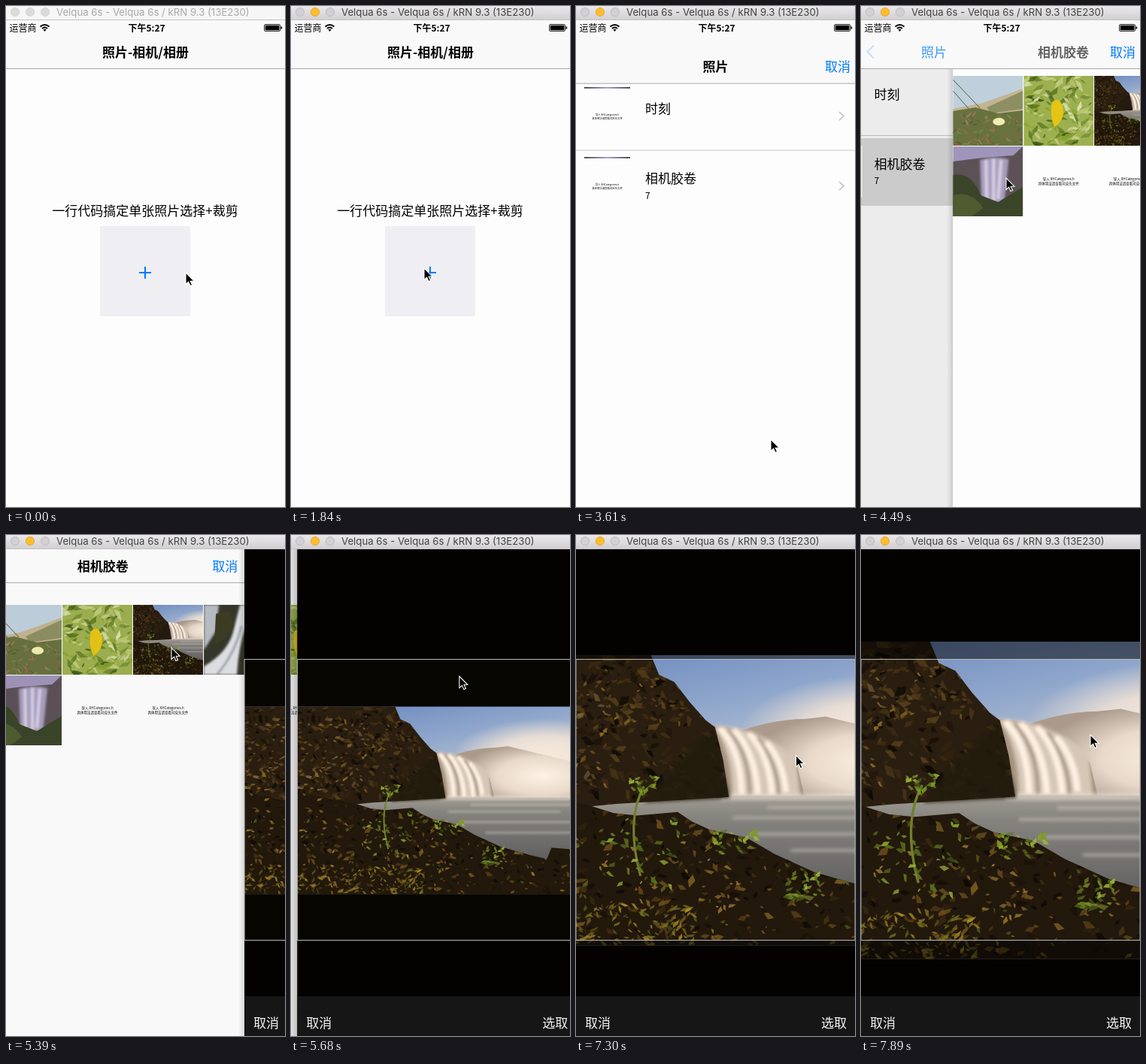
Recreate the animation shown at these times as an HTML page. Size 371 by 667 pixels, loop 8 s.

```html
<!DOCTYPE html>
<html lang="zh">
<head>
<meta charset="utf-8">
<style>
html, body { margin: 0; width: 100%; height: 100%; overflow: hidden; background: #fdfdfd; }
svg { display: block; }
#stage { width: 371px; height: 667px; font: 17px "Noto Sans CJK SC", "Noto Sans CJK", sans-serif; }
.mid { text-anchor: middle; }
.end { text-anchor: end; }
.bold { font-weight: 700; }
.blue { fill: #007aff; }
.big { font-size: 20px; }
.small { font-size: 12px; }
.line { fill: none; stroke-width: 2; }
</style>
</head>
<body>
<svg id="stage" viewBox="0 0 371 667">
  <defs>
    <linearGradient id="sky" x2="0.3" y2="1">
      <stop stop-color="#6685bd"/><stop offset=".3" stop-color="#91a8cc"/><stop offset=".65" stop-color="#d9d3cf"/>
    </linearGradient>
    <radialGradient id="mist">
      <stop stop-color="#fff3e5"/><stop offset=".55" stop-color="#f3e4d5" stop-opacity=".85"/><stop offset="1" stop-color="#eadfd6" stop-opacity="0"/>
    </radialGradient>
    <linearGradient id="water" x2="0" y2="1">
      <stop stop-color="#a09b93"/><stop offset=".15" stop-color="#85837e"/><stop offset=".7" stop-color="#5b5b5b"/>
    </linearGradient>
    <linearGradient id="bar" x2="0" y2="1"><stop stop-color="#eae8ea"/><stop offset="1" stop-color="#d0ced0"/></linearGradient>
    <linearGradient id="edge"><stop stop-opacity="0"/><stop offset="1" stop-opacity=".14"/></linearGradient>
    <linearGradient id="rim"><stop stop-color="#15151f"/><stop offset=".5" stop-color="#8d88c8"/><stop offset="1" stop-color="#15151f"/></linearGradient>
    <filter id="soft"><feGaussianBlur stdDeviation="1.4"/></filter>
    <clipPath id="cliffClip"><path id="cliff" d="M0 0H130L137 17 150 23 163 40 177 56 185 62 192 90 197 122 150 125 100 128 0 138Z"/></clipPath>
    <clipPath id="shoreClip"><path id="shore" d="M0 113L30 121 76 129 98 136 118 138 153 135 165 143 180 150 212 157 236 171 271 187 310 198 332 203 338 188 362 190 371 212V250H0Z"/></clipPath>

    <symbol id="fall" viewBox="0 0 371 250" preserveAspectRatio="xMidYMid slice">
      <rect width="371" height="250" fill="url(#sky)"/>
      <ellipse cx="330" cy="68" rx="125" ry="52" fill="url(#mist)"/>
      <path d="M205 66Q235 55 262 55L280 53 310 60 371 75V125H200Z" fill="#ab9a8b"/>
      <ellipse cx="325" cy="92" rx="110" ry="45" fill="url(#mist)"/>
      <path d="M184 61Q232 64 256 96L262 122H190Z" fill="#a59482"/>
      <g filter="url(#soft)">
        <path d="M184 61Q226 62 255 90L258 122H200Q200 84 184 61Z" fill="#d5c6b6"/>
        <path d="M189 63Q207 80 208 120M201 64Q220 84 222 120M214 67Q232 86 234 120M229 75Q244 92 246 118" fill="none" stroke="#fff1e2" stroke-width="5"/>
        <path d="M196 64Q215 84 215 121M222 71Q239 94 240 121" fill="none" stroke="#94826f" stroke-width="2"/>
      </g>
      <rect y="121" width="371" height="129" fill="url(#water)"/>
      <g filter="url(#soft)" stroke="#c9c3ba" stroke-width="3" opacity=".5">
        <path d="M190 122H371" stroke="#f1e6da" stroke-width="6"/><path d="M230 131H371M200 140H350M220 154H371M250 168H371"/>
      </g>
      <use href="#cliff" fill="#2a1e10"/>
      <g id="cliffSpecks" clip-path="url(#cliffClip)"/>
      <path d="M125 127Q146 92 184 66L198 123Z" fill="#241a10" opacity=".8" filter="url(#soft)"/>
      <use href="#shore" fill="#22180c"/>
      <g id="shoreSpecks" clip-path="url(#shoreClip)"/>
      <g id="plants"><path d="M121 190Q108 142 124 113" fill="none" stroke="#72802b" stroke-width="2"/></g>
    </symbol>
    <symbol id="dune" viewBox="0 0 93 93">
      <rect width="93" height="93" fill="#bfd0dc"/>
      <path d="M0 44L40 36 93 17V93H0Z" fill="#c2b491"/>
      <path d="M45 42L93 20V44L50 50Z" fill="#8d8f63"/>
      <path d="M0 5L36 43M0 20L22 45" stroke="#52583c"/>
      <path d="M0 47L30 42 60 50 93 46V93H0Z" fill="#68723f"/>
      <g id="duneSpecks"/>
      <ellipse cx="61" cy="61" rx="8" ry="5" fill="#f0edb0"/>
    </symbol>
    <symbol id="leaves" viewBox="0 0 93 93">
      <rect width="93" height="93" fill="#9db050"/>
      <g id="leafSpecks"/>
      <path d="M38 35Q48 26 52 42T41 68Q34 52 38 35Z" fill="#e6c414"/>
    </symbol>
    <symbol id="streams" viewBox="0 0 93 93">
      <rect width="93" height="93" fill="#35372a"/>
      <g filter="url(#soft)">
        <path d="M0 0H20L16 35 0 60Z" fill="#b9bec4"/>
        <path d="M48 0H70L56 28Q46 55 44 93H0V82Q34 62 40 32Z" fill="#dfe1e5"/>
        <path d="M72 0H93V93H60Q56 45 72 0Z" fill="#a9aeb5"/>
        <path d="M50 28Q42 64 18 92" fill="none" stroke="#989da4" stroke-width="3"/>
      </g>
      <path d="M16 12L34 8 40 28 30 44 14 54Z" fill="#3d3d24"/>
    </symbol>
    <symbol id="dusk" viewBox="0 0 93 93">
      <rect width="93" height="93" fill="#9f94b9"/>
      <path d="M0 20L40 15 80 12 93 0V93H0Z" fill="#5c5156"/>
      <g filter="url(#soft)">
        <path d="M36 18Q56 12 74 17L68 76H38Z" fill="#a89dbd"/>
        <path d="M44 18L45 72M54 16L54 74M64 18L60 70" stroke="#d9d0e6" stroke-width="4"/>
      </g>
      <path d="M0 38Q24 33 37 65L60 74 93 54V93H0Z" fill="#3b4529"/>
      <path d="M0 65Q25 58 40 82L25 93H0Z" fill="#4e5c30"/>
    </symbol>
    <g id="note" class="mid">
      <text y="-1">导入 XHCategories.h</text><text y="4.5">具体用法请查看对应头文件</text>
    </g>
    <path id="more" class="line" d="M-3-5.5L3 0-3 5.5" stroke="#c7c7cc"/>
    <g id="statusBar">
      <text class="small" x="4.5" y="33.5">运营商</text>
      <path class="line" d="M45.5 27.5Q51.5 22.5 57.5 27.5M48 30Q51.5 27 55 30" stroke="#000"/>
      <path d="M49.5 31.5Q51.5 30 53.5 31.5L51.5 34Z"/>
      <text class="mid small bold" x="187" y="33.5">下午5:27</text>
      <rect x="343.5" y="24.5" width="21" height="9" rx="1.5" fill="none" stroke="#000" stroke-width=".8"/>
      <rect x="344.7" y="25.7" width="18.6" height="6.6"/><path d="M366 27.5Q368 29 366 30.5Z" stroke="#000"/>
    </g>
  </defs>

  <rect width="371" height="667" fill="#fdfdfd"/>
  <rect width="371" height="83" fill="#f9f9f9"/><rect y="83" width="371" height="1" fill="#a9a9ab"/>
  <text class="mid bold" x="185.5" y="67.5">照片-相机/相册</text>
  <text class="mid" x="185" y="279">一行代码搞定单张照片选择+裁剪</text>
  <rect x="125" y="293" width="120" height="120" fill="#efeef3"/>
  <path class="line" d="M177 355H193M185 347V363" stroke="#007aff"/>
  <use id="statusUnder" href="#statusBar"/>

  <rect id="dim" width="371" height="667"/>
  <g id="sheet" class="mid big blue">
    <rect x="8" y="480" width="355" height="114" rx="13" fill="#fafafa"/>
    <rect x="8" y="537" width="355" height="1" fill="#d2d2d5"/>
    <rect x="8" y="602" width="355" height="57" rx="13" fill="#fafafa"/>
    <text x="185.5" y="516.5">拍照</text><text x="185.5" y="573.5">相册中获取</text>
    <text class="bold" x="185.5" y="638.5">取消</text>
  </g>

  <g id="modal">
    <g id="list">
      <rect y="19" width="371" height="648" fill="#fdfdfd"/>
      <rect id="picked" y="176" width="371" height="90" fill="#d9d9d9"/>
      <rect y="172" width="371" height="1" fill="#c8c7cc"/>
      <rect x="11" y="186" width="65" height="69" fill="#fdfdfd"/>
      <rect x="11" y="88.5" width="61" height="1.5" fill="url(#rim)"/><rect x="11" y="181.5" width="61" height="1.5" fill="url(#rim)"/>
      <g font-size="3.4"><use href="#note" x="41.5" y="127"/><use href="#note" x="41.5" y="220"/></g>
      <text x="92" y="123.5">时刻</text><text x="92" y="216.5">相机胶卷</text><text class="small" x="92" y="237">7</text>
      <use href="#more" x="353" y="127"/><use href="#more" x="353" y="220"/>
      <rect id="listShade" width="371" height="667"/>
    </g>
    <g id="grid">
      <rect x="-8" y="19" width="8" height="648" fill="url(#edge)"/>
      <rect y="19" width="371" height="648" fill="#fdfdfd"/>
      <g id="cells"></g>
      <rect id="gridShade" width="371" height="667"/>
    </g>
    <g id="nav">
      <rect y="19" width="375" height="64" fill="#f9f9f9"/><rect y="83" width="375" height="1" fill="#a9a9ab"/>
      <text id="listTitle" class="mid" y="67.5">照片</text>
      <path id="back" class="line" d="M17 52.5L8.5 61 17 69.5" stroke="#007aff"/>
      <text id="gridTitle" class="mid bold" y="67.5">相机胶卷</text>
      <text class="end blue" x="365" y="67.5">取消</text>
    </g>
  </g>

  <g id="crop">
    <rect x="-8" y="19" width="8" height="648" fill="url(#edge)"/>
    <rect y="19" width="371" height="648" fill="#060500"/>
    <svg width="371" height="667"><g id="zoom"><use href="#fall" x="-185.5" y="-125" width="371" height="250"/></g></svg>
    <path d="M0 19H371V165H0ZM0 540H371V614H0Z" opacity=".5"/>
    <rect y="165.5" width="371" height="374" fill="none" stroke="#b9b9b5"/>
    <rect y="614" width="371" height="53" fill="#161616"/>
    <g fill="#f4f4f4"><text x="12" y="656">取消</text><text class="end" x="360" y="656">选取</text></g>
  </g>

  <use id="statusOver" href="#statusBar"/>
  <g id="title">
    <rect id="titleBar" width="371" height="19"/><rect y="18" width="371" height="1" fill="#c4c2c4"/>
    <g id="lights" stroke-width=".8"><circle cx="12" cy="8" r="5.6"/><circle cx="32" cy="8" r="5.6"/><circle cx="52" cy="8" r="5.6"/></g>
    <text id="caption" x="67" y="12.7" font-family="Inter, sans-serif" font-size="13.2">Velqua 6s - Velqua 6s / kRN 9.3 (13E230)</text>
  </g>
  <path id="cursor" d="M0 0V15.5L3.6 12.2 6 17.5 8.6 16.4 6.2 11.2H11Z" stroke="#fff" stroke-width="1.1"/>
</svg>
<script>
const $ = id => document.getElementById(id);
const set = (id, attrs) => { for (const k in attrs) $(id).setAttribute(k, attrs[k]); };
const move = (id, x, y) => set(id, { transform: `translate(${x} ${y})` });

let seed = 7;
const rand = (a = 1, b = 0) => (seed = seed * 16807 % 2147483647, b + (a - b) * seed / 2147483647);

// Scatters small tilted lens shapes over a box.
function specks(id, n, [x, y, w, h], colors, size, flat = 0.5) {
  let out = '';
  for (let i = 0; i < n; i++) {
    const r = rand(size, size * 0.3), s = r * flat;
    out += `<path d="M${-r} 0L${-r * rand(0.6)} ${-s}L${r} ${rand(s, -s)}L${r * rand(0.5)} ${s}Z" fill="${colors[i % colors.length]}"
      opacity="${rand(0.95, 0.45)}" transform="translate(${x + rand(w)} ${y + rand(h)}) rotate(${rand(70, -70)})"/>`;
  }
  $(id).innerHTML += out;
}
const dark = ['#0d0905', '#1a1209', '#33240f'], gold = ['#6b4c1b', '#8a6a25', '#4b3513'];
const green = ['#7d9a25', '#a3b83c', '#56701c'];
specks('cliffSpecks', 300, [0, 0, 195, 138], [...dark, '#3f2d13', '#57401b'], 7);
specks('cliffSpecks', 150, [0, 15, 95, 100], [...gold, '#7c6444', '#120c06'], 5);
specks('cliffSpecks', 80, [85, 5, 75, 60], [...gold, '#120c06'], 4);
specks('shoreSpecks', 420, [0, 113, 371, 137], [...dark, ...gold], 6);
specks('shoreSpecks', 150, [0, 140, 330, 110], ['#57601b', '#8f7527', '#0d0905', '#a5803a'], 4);
specks('shoreSpecks', 170, [0, 212, 170, 38], ['#97801f', '#75701d', '#5d4a16', '#ab8d2c'], 5, 0.35);
specks('plants', 22, [112, 103, 24, 16], green, 4);
specks('plants', 40, [85, 138, 70, 62], green, 5);
specks('plants', 30, [183, 152, 38, 18], green, 5);
specks('plants', 30, [247, 187, 31, 26], green, 5);
specks('duneSpecks', 90, [0, 48, 93, 45], ['#87924f', '#9a5a45', '#4c5830', '#b07a5c'], 6, 0.25);
specks('leafSpecks', 120, [0, 0, 93, 93], ['#5d7a1e', '#86a02c', '#c4cf83', '#3f5a17', '#dbe2ae'], 11, 0.35);

$('cells').innerHTML = ['dune', 'leaves', 'fall', 'streams', 'dusk'].map((id, i) =>
  `<use href="#${id}" x="${i % 4 * 94}" y="${i < 4 ? 93 : 187}" width="93" height="93"/>`).join('') +
  '<g font-size="4.5"><use href="#note" x="140.5" y="233"/><use href="#note" x="234.5" y="233"/></g>';

const path = [[440, 239, 355], [1090, 177, 349], [2130, 177, 349], [2715, 259, 577], [3610, 259, 577], [4195, 193, 229],
  [4495, 193, 229], [5230, 220, 150], [5380, 220, 150], [6560, 245, 397], [6600, 245, 397], [7590, 305, 266]];
const ease = (t, a, b) => { const p = Math.min(1, Math.max(0, (t - a) / (b - a))); return p * p * (3 - 2 * p); };
const spring = (t, start, w = 17) => { const x = Math.max(0, t - start) * w / 1000; return 1 - (1 + x) * Math.exp(-x); };
const show = (id, on) => set(id, { visibility: on ? 'visible' : 'hidden' });

function draw(ms) {
  const step = 147.8, t = 500 + step * Math.floor((ms - 495) / step);

  const active = t > 1800;
  set('titleBar', { fill: active ? 'url(#bar)' : '#f6f6f6' });
  set('caption', { fill: active ? '#434343' : '#a9a9a9' });
  [...$('lights').children].forEach((c, i) => {
    const lit = active && i === 1;
    c.setAttribute('fill', lit ? '#fdbd2e' : active ? '#d3d0d4' : '#dadada');
    c.setAttribute('stroke', lit ? '#dfa023' : active ? '#b7b4b8' : '#d0d0d0');
  });

  const sheet = spring(t, 1897) * (1 - spring(t, 3200, 20));
  move('sheet', 0, 195 * (1 - sheet));
  set('dim', { opacity: 0.4 * Math.min(1, 1.12 * sheet) });

  const modal = spring(t, 3390, 25), push = spring(t, 4355), crop = spring(t, 5338);
  show('modal', modal);
  show('grid', push);
  show('crop', crop);
  show('picked', push);
  show('statusUnder', !modal);
  show('statusOver', modal && !crop);
  move('modal', 0, 648 * (1 - modal));
  move('list', -111 * push, 0);
  move('grid', 371 * (1 - push) - 130 * crop, 0);
  move('nav', -390 * crop, crop ? -20 : 0);
  move('crop', 371 * (1 - crop), 0);
  set('listShade', { opacity: 0.1 * push });
  set('gridShade', { opacity: 0.12 * crop });
  set('listTitle', { x: 185.5 - 146 * push ** 1.25, fill: push ? '#007aff' : '#000', opacity: push ? 0.3 + 0.7 * push : 1, 'font-weight': push ? 400 : 700 });
  set('gridTitle', { x: 185.5 + 253 * (1 - push), opacity: push ** 1.3 });
  set('back', { opacity: push ** 4 });

  const zoom = 1 + 0.692 * ease(t, 6600, 7590);
  set('zoom', { transform: `translate(185.5 353.3) scale(${zoom})` });

  let [, x, y] = path[0];
  for (let i = 1; i < path.length; i++) {
    const [a, x0, y0] = path[i - 1], [b, x1, y1] = path[i];
    if (t < a) break;
    const p = ease(t, a, b);
    x = x0 + (x1 - x0) * p;
    y = y0 + (y1 - y0) * p;
  }
  move('cursor', x, y);
}

const begin = performance.now();
(function tick() {
  draw((performance.now() - begin) % 8000);
  requestAnimationFrame(tick);
})();
</script>
</body>
</html>
```
